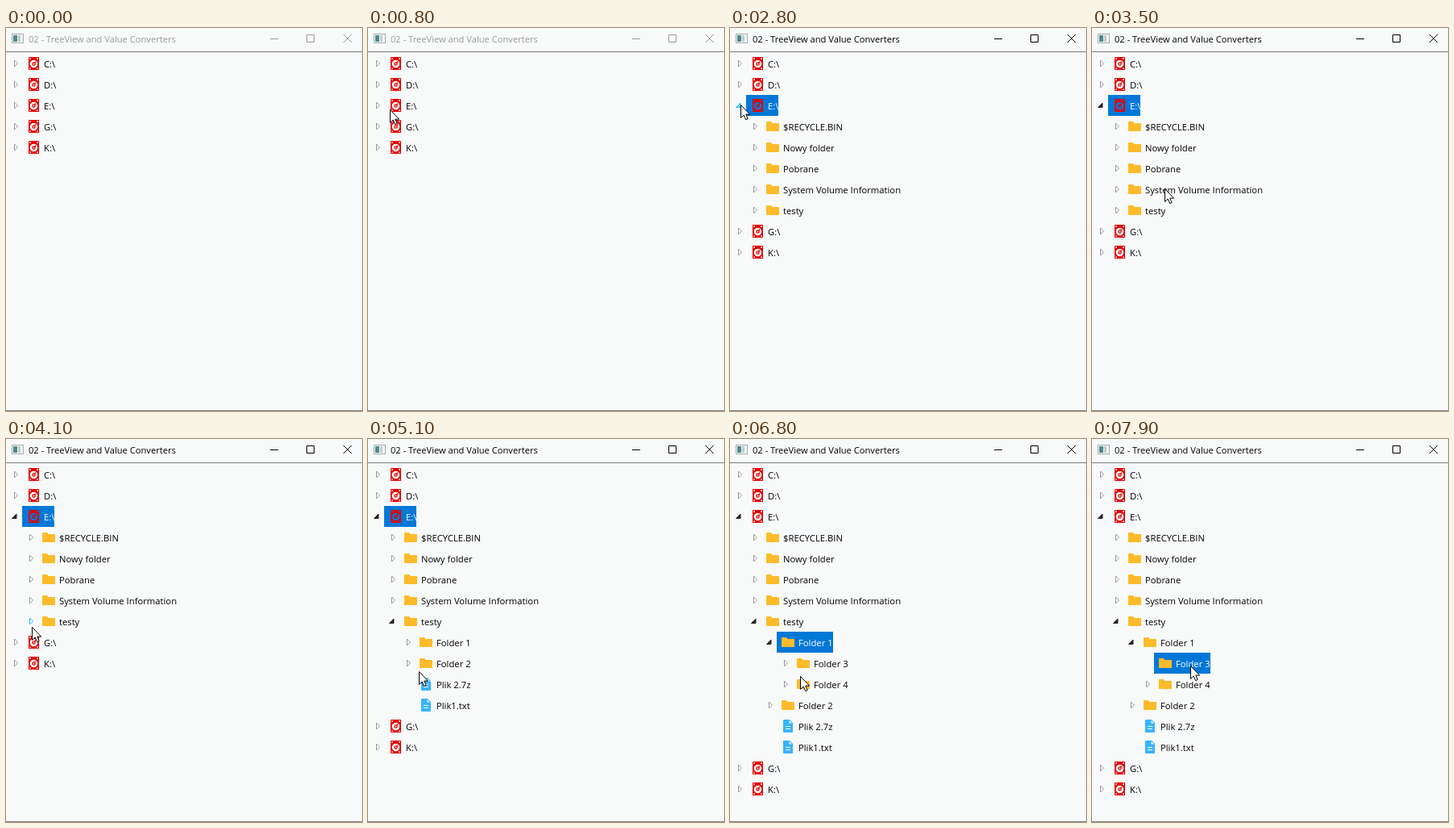
Write an HTML page that moves like this. It is 442x475 px and loops after 8000 ms.

```html
<!DOCTYPE html>
<html lang="en">
<head>
<meta charset="utf-8">
<title>TreeView and Value Converters</title>
<style>
  html, body { margin: 0; width: 100%; height: 100%; overflow: hidden; background: #f8faf9; }
  svg { display: block; width: 442px; height: 475px; }
  text { font: 11.25px "Open Sans", "Noto Sans", sans-serif; white-space: pre; }
</style>
</head>
<body>
<svg viewBox="0 0 442 475">
  <rect width="442" height="475" fill="#f8faf9"/>
  <path d="M0 29.5H442M0 474.5H442" stroke="#7c7e7d"/>
  <g id="appIcon">
    <rect x="7.5" y="7.5" width="14" height="11" fill="#f4f6f6" stroke="#a3abad"/>
    <rect x="9" y="9" width="5" height="8" fill="#4d8a8c"/>
    <rect x="15" y="9" width="3" height="8" fill="#c3cbcd"/>
  </g>
  <text id="caption" x="28" y="18" style="font-size:11.15px">02 - TreeView and Value Converters</text>
  <path id="buttons" d="M328 13.5H338M373.5 8.5H382.5V17.5H373.5ZM419 8L429 18M429 8L419 18" fill="none"/>
  <g id="tree"></g>
  <path id="cursor" d="M.5 .5V16.4L4.2 13L6.7 18.6L9.2 17.6L6.8 12.1H11.6Z" fill="#fff" stroke="#000"/>
</svg>
<script>
const LOOP = 8000, STEP = 100, ROW = 26, INDENT = 19;
const BG = '#f8faf9', BLUE = '#0078d7', RED = '#e60000';
const byId = id => document.getElementById(id);

// open: time a node expands, pick: time it is selected, empty: time its arrow goes
const node = kind => (name, more, ...children) => ({ kind, name, children, ...more });
const drive = node('drive'), folder = node('folder'), file = node('file');

const tree = [
  drive('C:\\'),
  drive('D:\\'),
  drive('E:\\', { open: 2800, pick: 2000, width: 40 },
    folder('$RECYCLE.BIN'),
    folder('Nowy folder'),
    folder('Pobrane'),
    folder('System Volume Information'),
    folder('testy', { open: 4500 },
      folder('Folder 1', { open: 6200, pick: 5600, width: 70 },
        folder('Folder 3', { empty: 7500, pick: 7900, width: 70 }),
        folder('Folder 4')),
      folder('Folder 2'),
      file('Plik 2.7z', { empty: 0 }),
      file('Plik1.txt', { empty: 0 }))),
  drive('G:\\'),
  drive('K:\\')
];

const flatten = (list, t, depth = 0) => list.flatMap(n =>
  [{ ...n, depth }, ...(t >= n.open ? flatten(n.children, t, depth + 1) : [])]);

// each move bends towards a control point and then rests
const entry = { x: 377, y: 35 };
const moves = [
  { from: 200, to: 800, bend: [-85, 100], x: 27, y: 101 },
  { from: 2400, to: 2600, bend: [20, 97], x: 13, y: 95 },
  { from: 2900, to: 4100, bend: [157, 233], x: 32, y: 233 },
  { from: 4700, to: 5600, bend: [75, 335], x: 80, y: 256 },
  { from: 5600, to: 6100, bend: [70, 282], x: 51, y: 254 },
  { from: 6500, to: 7100, bend: [113, 320], x: 70, y: 282 },
  { from: 7600, to: 7800, bend: [96, 284], x: 122, y: 281 }
];

function pointerAt(t) {
  const i = moves.findLastIndex(m => t >= m.from);
  if (i < 0) return null;
  const a = moves[i - 1] || entry, b = moves[i];
  const u = Math.min(1, (t - b.from) / (b.to - b.from));
  const curve = (p, q, r) => Math.round((1 - u) ** 2 * p + 2 * u * (1 - u) * q + u * u * r);
  return { x: curve(a.x, b.bend[0], b.x), y: curve(a.y, b.bend[1], b.y) };
}

const icons = {
  drive(x, y, bg) {
    const dots = [2, 11].map(a => `<circle cx="${a}" cy="2" r="1"/><circle cx="${a}" cy="14.2" r=".9"/>`).join('');
    return `<g transform="translate(${x + 8} ${y - 8})" fill="${bg}">
      <rect width="13" height="16" rx=".5" fill="${RED}"/>${dots}
      <circle cx="6.5" cy="8.5" r="4.8"/>
      <path d="M6.5 8.5L9 5.5" stroke="${RED}" stroke-width="1.3"/>
      <circle cx="6.5" cy="8.5" r="2.2" fill="${RED}"/>
      <circle cx="6.5" cy="8.5" r=".9"/></g>`;
  },
  folder(x, y) {
    return `<path transform="translate(${x + 6} ${y - 6})" fill="#fdbb2a"
      d="M.5 0H6L7.5 2H15.5L16 2.5V11.5L15.5 12H.5L0 11.5V.5Z"/>`;
  },
  file(x, y, bg) {
    return `<g transform="translate(${x + 8} ${y - 8})">
      <path d="M.5 0H8L12 4V15.5L11.5 16H.5L0 15.5V.5Z" fill="#39b4fa"/>
      <path d="M7.5 1V4.5H11Z" fill="${bg}"/>
      <path d="M3 8.5H9M3 11.5H9" stroke="${bg}"/></g>`;
  }
};

function arrow(x, y, open, hover) {
  const d = open
    ? `M${x + 2.5} ${y - 3}V${y + 2.5}H${x - 3}Z`
    : `M${x} ${y - 4}L${x + 4} ${y}L${x} ${y + 4}Z`;
  const fill = open ? (hover ? '#82dffb' : '#262626') : '#fff';
  const stroke = hover ? '#1cbdf8' : open ? '#262626' : '#989898';
  return `<path d="${d}" fill="${fill}" stroke="${stroke}" stroke-linejoin="round"/>`;
}

function row(n, index, t, pointer, lastPick) {
  const left = 20 + INDENT * n.depth, y = 44 + ROW * index, ax = left - 9.5;
  const on = n.pick === lastPick;
  const hover = pointer && Math.abs(pointer.x - ax) <= 8 && Math.abs(pointer.y - y) <= 8;
  let out = on ? `<rect x="${left}" y="${y - 13}" width="${n.width}" height="${ROW}" fill="${BLUE}"/>` : '';
  if (!(t >= n.empty)) out += arrow(ax, y, t >= n.open, hover);
  out += icons[n.kind](left, y, on ? BLUE : BG);
  return out + `<text x="${left + 27}" y="${y + 5}" fill="${on ? '#fff' : '#000'}">${n.name}</text>`;
}

function draw(t) {
  const rows = flatten(tree, t), pointer = pointerAt(t);
  const lastPick = Math.max(...rows.map(n => t >= n.pick ? n.pick : 0));
  const ink = lastPick ? '#000' : '#999';
  byId('caption').setAttribute('fill', ink);
  byId('buttons').setAttribute('stroke', ink);
  byId('tree').innerHTML = rows.map((n, i) => row(n, i, t, pointer, lastPick)).join('');
  const cursor = byId('cursor');
  cursor.setAttribute('visibility', pointer ? 'visible' : 'hidden');
  if (pointer) cursor.setAttribute('transform', `translate(${pointer.x} ${pointer.y})`);
}

let last = -1;
const start = performance.now();
function tick() {
  const t = Math.floor((performance.now() - start) % LOOP / STEP) * STEP;
  if (t !== last) draw(last = t);
  requestAnimationFrame(tick);
}
tick();
</script>
</body>
</html>
```
